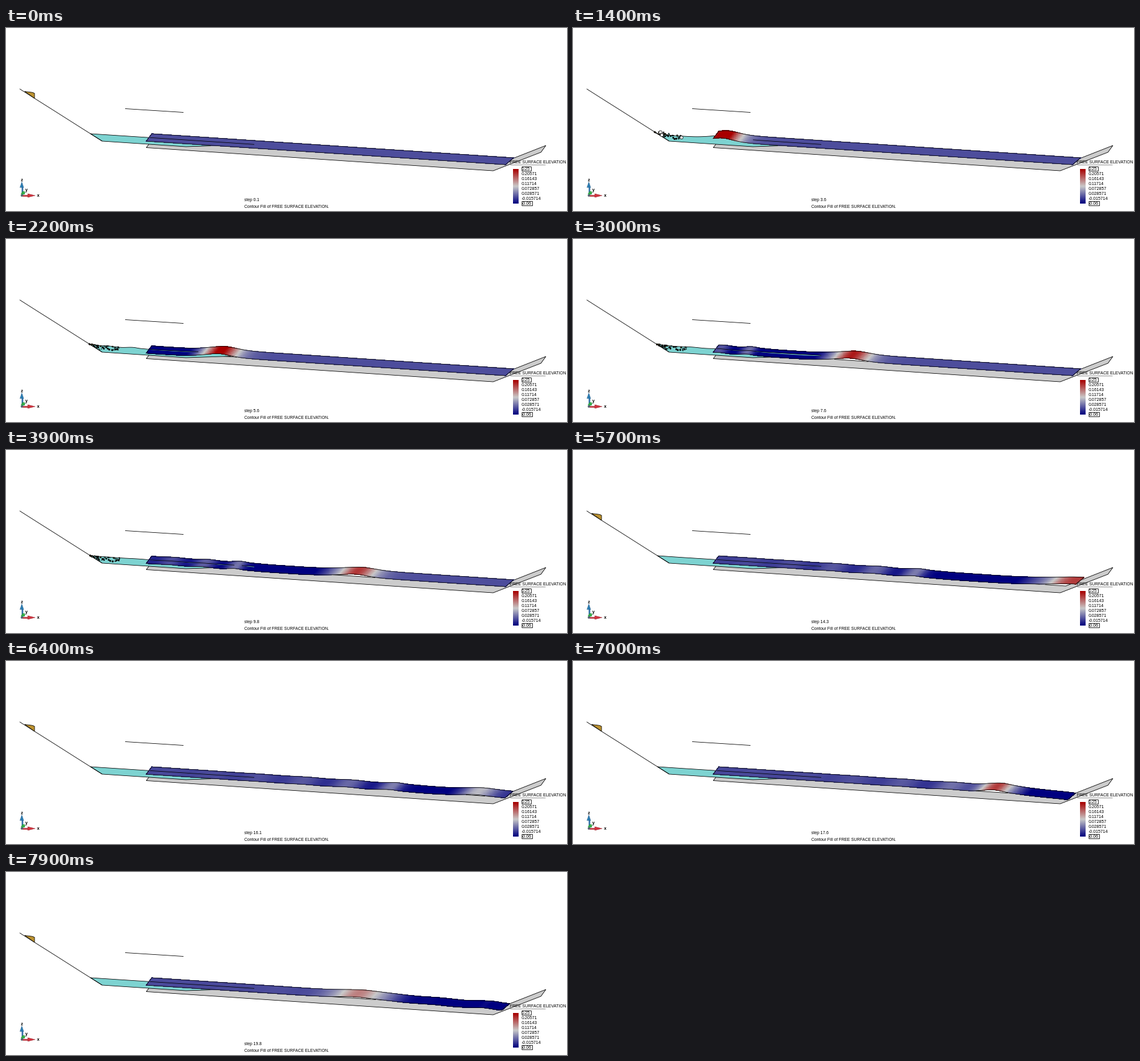
These frames come from a looping animation (904 px wide and 296 px high, 8000 ms). A matplotlib script:

```python
import numpy as np
import matplotlib.pyplot as plt
from matplotlib.animation import FuncAnimation
from matplotlib.collections import PolyCollection
from matplotlib.colors import LinearSegmentedColormap

W, H, DPI = 904, 296, 64
FRAMES, INTERVAL = 80, 100
PT = 72 / DPI                  # points per pixel
LIFT = 20                      # pixels per metre of elevation
LOW, HIGH = -0.06, 0.25
WALL = 827.5                   # effective reflection point
SLIDE_END = 10.0               # the landslide model is reset after this step
TEAL, GOLD, GREY = "#7dd3d1", "#bd9331", "#cccccc"

cmap = LinearSegmentedColormap.from_list(
    "elevation", [(0, 0, 0.5), (0.79, 0.79, 0.79), (0.66, 0, 0)])

fig = plt.figure(figsize=(W / DPI, H / DPI), dpi=DPI, facecolor="white")
ax = fig.add_axes([0, 0, 1, 1])
ax.axis("off")


def line(points, z, color="black", width=0.8):
    xs, ys = zip(*points)
    return ax.plot(xs, ys, color=color, lw=width * PT, zorder=z,
                   solid_capstyle="butt")[0]


def shape(points, color, z, edge="black", width=0.8):
    return ax.add_patch(plt.Polygon(points, facecolor=color, edgecolor=edge,
                                    lw=width * PT, zorder=z))


def label(x, y, text, size=6.7, **style):
    return ax.text(x, y, text, fontsize=size * PT, family="Liberation Sans",
                   va="baseline", zorder=20, **style)


# ---- wave model -------------------------------------------------------
def incoming(x, t):
    """Leading crest, the trough behind it and a dispersive tail."""
    crest = 452 + 51.8 * (t - 7.6)
    bump = 285 + 40 * (t - 7.6)
    gap = crest - bump
    height = 0.15 + 0.15 * np.exp(-(t - 3.6) / 6.5)
    width = 24 + 0.6 * (t - 3.6)
    eta = height / np.cosh((x - crest) / width) ** 2
    middle = 0.6 * bump + 0.4 * crest
    eta -= 0.09 * np.exp(-((x - middle) / (0.33 * gap)) ** 4)
    d, period = x - bump, 25 + 3 * t
    envelope = (np.exp(np.minimum(d, 0) / 110)
                * np.exp(-(np.maximum(d, 0) / (0.25 * period)) ** 2))
    eta += 0.05 * np.cos(2 * np.pi * d / period) * envelope
    eta -= 0.03 * np.exp(-(t - 7.6) / 5) / (1 + np.exp(d / 20))
    return eta


def elevation(x, t):
    onset = np.clip((t - 1.2) / 1.2, 0, 1)
    return onset * (incoming(x, t) + incoming(2 * WALL - x, t))


def still_level(x):
    return 171 + (x - 136) * 0.0655


def floor_level(x):
    return np.where(x < 155, 171 + (x - 136) * 0.632, 183 + (x - 155) * 0.0667)


# ---- fixed scenery ----------------------------------------------------
shape([(235, 181.8), (794, 220), (870, 190), (862, 201), (785, 231), (226, 193.5)],
      GREY, 1)
line([(22, 98.5), (155, 183)], 4)
line([(192, 130.5), (286, 136.5)], 4)

ax.imshow(np.linspace(1, 0, 64)[:, None], cmap=cmap, extent=(817, 826, 284, 228),
          aspect="auto", zorder=15)
ax.set_xlim(0, W)
ax.set_ylim(H, 0)
label(812, 219, "FREE SURFACE ELEVATION")
line([(812, 221), (869, 221)], 19, "#777777")
values = ["0.25", "0.20571", "0.16143", "0.11714",
          "0.072857", "0.028571", "-0.015714", "-0.06"]
for k, value in enumerate(values):
    label(831, 229.6 + 8 * k, value, 7)
for y, w in ((223.5, 15), (279.5, 17)):
    shape([(830.5, y), (830.5 + w, y), (830.5 + w, y + 7), (830.5, y + 7)],
          "none", 19)
step_text = label(384, 280, "")
label(384, 291, "Contour Fill of FREE SURFACE ELEVATION.")

# axis triad
line([(25.5, 271), (25.5, 257)], 16, "#2f6fa8", 2.5)
line([(26, 271), (36, 271)], 16, "#b8323a", 2.5)
shape([(22.5, 258), (25.5, 249), (28.5, 258)], "#2b7fb5", 17, "#1d4f7c", 0.4)
shape([(35, 268), (47, 271), (35, 274)], "#d23440", 17, "#8c2028", 0.4)
shape([(24, 269), (27, 264), (30.5, 265), (30, 269)], "#35b04a", 18, "#1f7a35", 0.4)
ax.add_patch(plt.Circle((25.5, 271), 1.8, color="#556270", lw=0, zorder=18))
for x, y, name in ((24, 247.5, "z"), (30.5, 264, "y"), (49.5, 273, "x")):
    label(x, y, name, 7, weight="bold")

# ---- moving parts -----------------------------------------------------
pool = shape([(0, 0)] * 3, TEAL, 3)
surface = ax.add_collection(PolyCollection(
    [], cmap=cmap, norm=plt.Normalize(LOW, HIGH), edgecolors="face",
    linewidths=0.3, antialiased=False, zorder=5))
sliver = ax.add_collection(PolyCollection(
    [], facecolors=TEAL, edgecolors="none", zorder=6))
seam = line([(0, 0), (0, 0)], 7)
outline = line([(0, 0), (0, 0)], 8)
block = shape([(0, 0)] * 3, GOLD, 6)
debris = ax.scatter([], [], zorder=9)

rng = np.random.default_rng(4)
COUNT, TRAIL, RINGS = 60, 6, 5
reach = rng.random(COUNT) ** 2.2
depth = rng.uniform(0.05, 0.95, COUNT)
hop = rng.random(COUNT)
phase = rng.uniform(0, 2 * np.pi, COUNT)
sizes = rng.uniform(0.8, 2.4, COUNT)
faces = np.array(["black", "black", "#5b4a1c", TEAL])[rng.integers(0, 4, COUNT)]

s = np.linspace(0, 1, 301)
mid_x = 230.5 + 581 * s
pool_x = np.linspace(136, 400, 133)


def draw_surface(t):
    eta = elevation(mid_x, t)
    run_up = 45 * np.clip(eta[-1], -0.2, 0.12) * np.clip((s - 0.96) / 0.04, 0, 1)
    front = np.column_stack([226 + 579 * s + run_up, 183 + 38 * s - LIFT * eta])
    back = np.column_stack([235 + 583 * s + run_up, 171 + 39 * s - LIFT * eta])
    surface.set_verts(np.stack([front[:-1], front[1:], back[1:], back[:-1]], axis=1))
    surface.set_array((eta[:-1] + eta[1:]) / 2)
    loop = np.vstack([front, back[::-1], front[:1]])
    outline.set_data(loop[:, 0], loop[:, 1])


def draw_pool(t):
    eta = elevation(pool_x, t)
    share = 0.7 * np.clip((400 - pool_x) / 166, 0, 1) * np.clip((pool_x - 136) / 20, 0, 1)
    top = still_level(pool_x) - LIFT * eta * share
    sheet = still_level(pool_x) - LIFT * eta
    rim = np.column_stack([pool_x, top])
    pool.set_xy(np.vstack([rim, [(290, 192), (155, 183)]]))

    inside = pool_x >= 232
    shown = inside & (top <= sheet + 0.3)
    seam.set_data(pool_x, np.where(shown, top, np.nan))
    x, low = pool_x[inside], np.maximum(sheet, top)[inside]
    sliver.set_verts([np.vstack([rim[inside], np.column_stack([x, low])[::-1]])])


def draw_slide(t):
    moving = t < SLIDE_END
    shift = 37 * (t - 0.1) ** 2 if moving else 0
    block.set_visible(shift < 105)
    flat = 1 - 0.5 * min(shift / 105, 1)
    corners = np.array([(30, 1), (43, 7.6), (46, 8), (46, 0)])
    x = corners[:, 0] + shift + (corners[:, 0] - 38) * (1 - flat) * 0.7
    block.set_xy(np.column_stack([x, 98.5 + (x - 22) * 0.637 - corners[:, 1] * flat]))

    debris.set_visible(moving and shift > 85)
    spread = 1 - np.exp(-max(t - 1.4, 0) / 1.3)
    early = np.exp(-max(t - 1.8, 0) / 2)
    px = 138 + 47 * reach * spread + 0.8 * np.sin(1.7 * t + phase)
    top, bottom = still_level(px), floor_level(px)
    py = top + (bottom - top) * depth * (1 - 0.4 * reach)
    py += 0.5 * np.cos(1.3 * t + phase)
    py -= 13 * early * hop * (1 - reach) * np.abs(np.sin(t + phase))
    py = np.minimum(py, bottom)

    # a few remains still running down the slope
    px[:TRAIL] = 136 - 12 * early * depth[:TRAIL]
    py[:TRAIL] = 171 + (px[:TRAIL] - 136) * 0.637
    rings = (np.arange(COUNT) >= COUNT - RINGS) & (early > 0.25)
    debris.set_offsets(np.column_stack([px, py]))
    debris.set_sizes((np.where(rings, 5, sizes) * PT) ** 2)
    debris.set_facecolor(["white" if ring else face for ring, face in zip(rings, faces)])
    debris.set_edgecolor("black")
    debris.set_linewidth(0.7 * PT)


def update(i):
    t = 0.1 + 0.25 * i
    tenths = (10 + 25 * i) // 10
    step_text.set_text(f"step {tenths // 10}.{tenths % 10}")
    draw_surface(t)
    draw_pool(t)
    draw_slide(t)
    return []


anim = FuncAnimation(fig, update, frames=FRAMES, interval=INTERVAL,
                     repeat=True, repeat_delay=0, blit=False)
plt.show()
```
